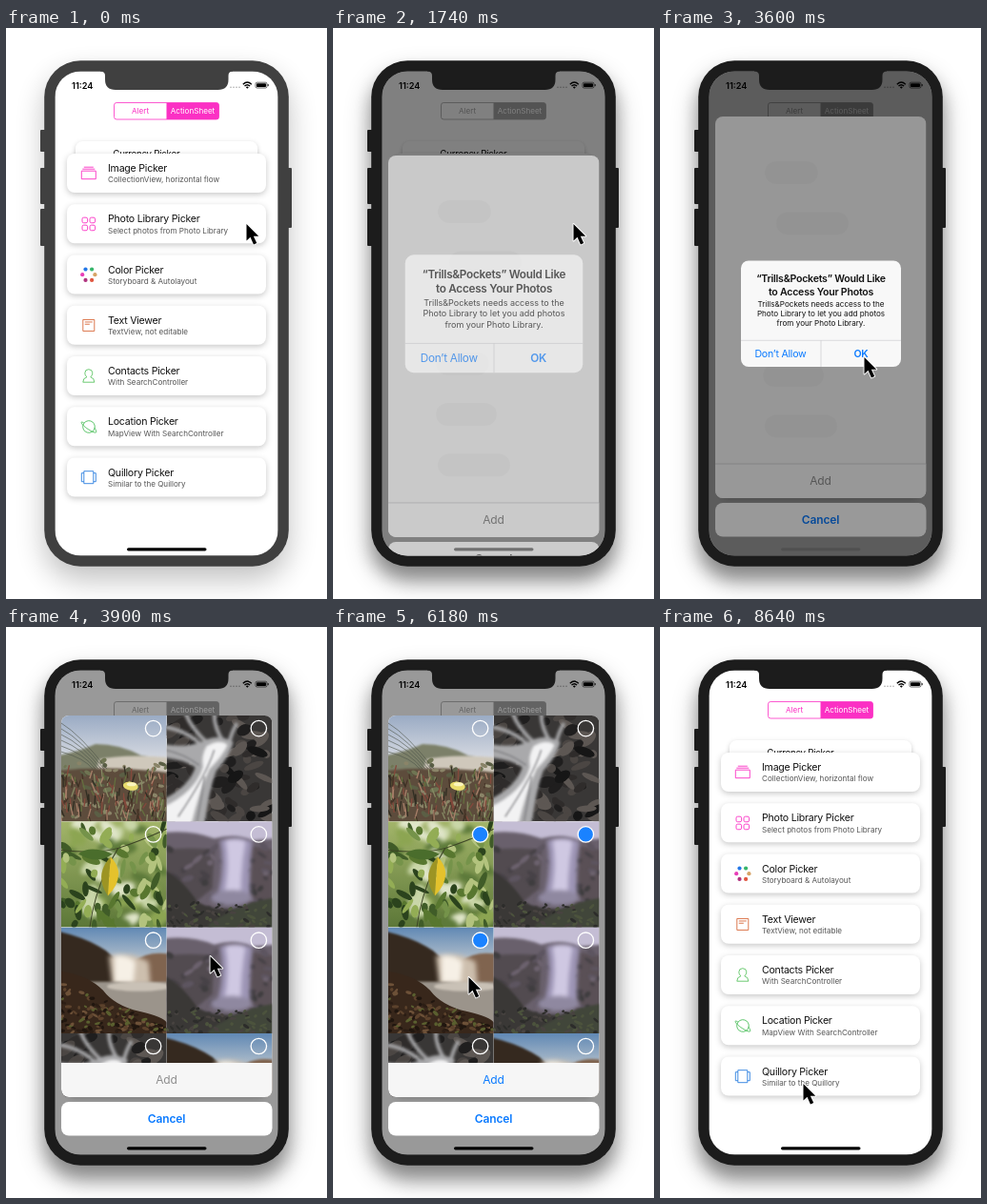
These frames come from a looping animation (337 px wide and 600 px high, 9.66 s). An HTML page:

```html
<!DOCTYPE html>
<html lang="en">
<head>
<meta charset="utf-8">
<title>Picker demo</title>
<style>
  html, body { margin: 0; width: 100%; height: 100%; overflow: hidden; background: #fff; }
  svg { display: block; width: 337px; height: 600px; }
  text { font-family: Inter, "Open Sans", sans-serif; }
  .title { font-size: 10.6px; letter-spacing: -.24px; fill: #111; }
  .sub { font-size: 8.1px; fill: #555; }
  .big { font-size: 12px; letter-spacing: -.15px; }
  .mid { text-anchor: middle; }
  .bold { font-weight: 600; }
  .card { fill: #fff; filter: drop-shadow(0 2px 3px rgba(0, 0, 0, .22)); }
  .line { fill: none; stroke-width: .9; }
  .rule { stroke: #c4c4c8; stroke-width: .6; }
</style>
</head>
<body>
<svg id="stage" viewBox="0 0 337 600"></svg>
<script>
const LOOP = 9660, STEP = 60;
const PINK = '#fb30c4', BLUE = '#1a82ff', GREY = '#a4a4a4';

let seed = 7;
const rnd = (a = 0, b = 1) => {
  seed = (seed * 16807) % 2147483647;
  return a + (b - a) * seed / 2147483647;
};
const pick = list => list[Math.floor(rnd(0, list.length))];
const many = (n, f) => Array.from({ length: n }, (_, i) => f(i)).join('');
const text = (x, y, s, cls, more = '') => `<text x="${x}" y="${y}" class="${cls}" ${more}>${s}</text>`;
const rect = (x, y, w, h, r, fill, more = '') =>
  `<rect x="${x}" y="${y}" width="${w}" height="${h}" rx="${r}" fill="${fill}" ${more}/>`;
const path = (d, fill, more = '') => `<path d="${d}" fill="${fill}" ${more}/>`;
const stroke = (d, color, w) => path(d, 'none', `stroke="${color}" stroke-width="${w}"`);
const gradient = (id, a, b) =>
  `<linearGradient id="${id}" x2="0" y2="1"><stop stop-color="${a}"/><stop offset="1" stop-color="${b}"/></linearGradient>`;
const leaf = (x, y, rx, ry, turn, fill) =>
  `<ellipse rx="${rx}" ry="${ry}" fill="${fill}" transform="translate(${x} ${y}) rotate(${turn})"/>`;
const soft = (blur, art) => `<g style="filter:blur(${blur}px)">${art}</g>`;

// Scattered specks between the line y = top + slope * x and the bottom of a tile
const specks = (n, top, slope, size, colors) => many(n, () => {
  const x = rnd(0, 111), y = rnd(Math.min(111, top + slope * x), 111);
  return leaf(x, y, rnd(size / 3, size), rnd(size / 4, size / 2), rnd(-50, 50), pick(colors));
});

// Simplified landscapes on a 111 x 111 tile
const photos = {
  dune: () => rect(0, 0, 111, 60, 0, 'url(#haze)') +
    soft(.8, path('M-4 42Q18 38 36 30Q62 30 84 42L114 46V75H-4Z', '#7c8069') +
      path('M40 46Q66 40 114 44V60H36Z', '#cfc8bb') +
      path('M-4 58Q50 52 114 60V114H-4Z', '#5d4c3c')) +
    specks(60, 44, .05, 5, ['#6f7553', '#8a8468', '#5b5f45']) +
    many(170, () => {
      const x = rnd(0, 111), y = rnd(64, 114);
      return stroke(`M${x} ${y}l${rnd(-4, 4)} ${-rnd(5, 13)}`,
        pick(['#84493c', '#65703f', '#a9806a', '#302d22', '#868a64', '#453326']), 1.3);
    }) +
    many(6, i => stroke(`M0 ${8 + i * 6}Q${20 + i} ${20 + i * 5} ${48 - i * 3} 56`, '#4c5248', .6)) +
    leaf(73, 74, 8, 4.5, 8, '#e9dc6c') + leaf(74, 72, 5, 2, 0, '#fbf5bd'),

  stream: () => rect(0, 0, 111, 111, 0, '#393736') +
    specks(90, 0, 0, 12, ['#1f1e1e', '#4b4643', '#161616', '#5d5753', '#2f2c2b']) +
    soft(1.6, stroke('M-2 12Q22 16 40 34M20 -2Q26 14 44 30M50 -2Q50 14 60 28M74 8Q68 18 66 28', '#a3a3a5', 4) +
      path('M36 28Q54 18 70 28Q66 44 52 58Q44 80 40 114H-4V88Q24 74 30 54Q16 46 -4 44V30Q18 34 36 28Z', '#a9a9ab') +
      path('M42 32Q56 24 64 31Q58 44 45 56Q34 80 26 114H-4V96Q30 80 38 54Q36 42 42 32Z', '#f2f2f3')) +
    soft(.8, stroke('M50 36Q42 62 12 106M40 64Q36 90 32 111M-2 36Q18 40 34 52', '#7d7d80', 1.3)),

  leaves: () => rect(0, 0, 111, 111, 0, 'url(#green)') +
    soft(2, specks(40, 0, 0, 15, ['#c9d6a8', '#8ca552', '#dfe5c8', '#5d7a3a'])) +
    soft(.5, many(75, () => leaf(rnd(0, 111), rnd(0, 111), rnd(4, 11), rnd(2, 4.5), rnd(20, 130),
      pick(['#405c28', '#75934a', '#93ad55', '#2b431d', '#b3c37e', '#58772f'])))) +
    stroke('M0 30Q40 34 60 28T111 8M30 111Q36 66 60 28', '#3c4425', 1) +
    path('M18 34Q30 24 54 34Q38 46 18 34Z', '#4a6d2c') +
    path('M52 37Q34 56 49 78Z', '#9c9424') + path('M52 37Q70 56 49 78Z', '#e4c22c'),

  falls: () => rect(0, 0, 111, 111, 0, '#c4bdd4') +
    soft(1.5, path('M-4 12Q24 8 50 18Q72 12 90 20L114 18V114H-4Z', '#69606c') +
      path('M-4 30Q26 26 50 30L48 70L24 90H-4Z', '#524b50') +
      path('M90 26L114 30V90H84Z', '#5a5056')) +
    soft(1, specks(70, 26, 0, 7, ['#5d5560', '#474247', '#6c626e', '#3f3d3f'])) +
    soft(2, path('M56 20Q74 14 90 21Q86 50 88 82H52Q62 50 56 20Z', '#9d95b5') +
      path('M62 20Q74 17 83 21Q78 48 78 78H60Q67 48 62 20Z', '#cfc8e2') +
      leaf(68, 80, 22, 8, 0, '#8f88a0')) +
    soft(1, path('M-4 50Q16 60 32 84Q58 100 114 84V114H-4Z', '#3a3836') +
      path('M44 108Q80 84 114 80V114H44Z', '#41463a')) +
    specks(70, 84, .04, 4, ['#2c2c2a', '#4c533d', '#484340']),

  gorge: () => rect(0, 0, 111, 60, 0, 'url(#sky)') +
    soft(1, path('M76 36Q92 24 114 28V62H76Z', '#80644f') +
      path('M-4 4Q22 10 40 20Q56 28 62 44L60 64H-4Z', '#35291f')) +
    soft(2.5, path('M50 30Q70 24 92 36L94 62H54Z', '#cdbfae') +
      path('M56 30Q68 28 78 36L76 58H56Z', '#f6f0e6')) +
    soft(1.2, path('M30 57H114V102H30Z', '#9b948b') + leaf(82, 62, 34, 5, 0, '#c9c1b6')) +
    path('M0 46Q28 50 44 66Q56 82 82 88T111 100V111H0Z', '#38271b') +
    specks(150, 56, .45, 4, ['#5c422c', '#20160f', '#6d5138', '#5a5f2f', '#2b1d14'])
};
const symbols = Object.entries(photos)
  .map(([id, art]) => `<symbol id="${id}" viewBox="0 0 111 111" preserveAspectRatio="none">${art()}</symbol>`).join('');
const tiles = ['dune', 'stream', 'leaves', 'falls', 'gorge', 'falls', 'stream', 'gorge'];
const tileX = i => 58 + (i % 2) * 110.75, tileY = i => 93 + (i >> 1) * 111.3;
const tile = (id, i) => `<use href="#${id}" x="${tileX(i)}" y="${tileY(i)}" width="110.75" height="111.3"/>` +
  `<circle id="mark${i}" cx="${tileX(i) + 96.6}" cy="${tileY(i) + 13.6}" r="8.2" stroke="#fff" stroke-width="1.3"/>`;

// Icons are centred on 0,0
const icon = (d, color) => `<path class="line" stroke="${color}" d="${d}"/>`;
const rows = [
  ['Image Picker', 'CollectionView, horizontal flow',
    icon('M-7.5 -2.5H7.5V6H-7.5ZM-6.5 -4.5H6.5M-5 -6.5H5', PINK)],
  ['Photo Library Picker', 'Select photos from Photo Library',
    many(4, i => rect(i % 2 ? 1.2 : -6.8, i > 1 ? 1.2 : -6.8, 5.6, 5.6, 1.6, 'none', `stroke="${PINK}" stroke-width=".9"`))],
  ['Color Picker', 'Storyboard &amp; Autolayout',
    ['#35b56a', '#d6a466', '#e0563f', '#b0337f', '#e83fb8', '#2478e8'].map((c, i) => {
      const a = (i - 1) * Math.PI / 3;
      return `<circle cx="${6.6 * Math.cos(a)}" cy="${6.6 * Math.sin(a)}" r="2.1" fill="${c}"/>`;
    }).join('')],
  ['Text Viewer', 'TextView, not editable',
    icon('M-6 -6H6V6H-6ZM-4 -3.5H4M-4 -1.2H1', '#d9693c')],
  ['Contacts Picker', 'With SearchController',
    icon('M-6 6.5Q-6 2 -2 1.2Q-4 -1 -4 -3A4 4 0 0 1 4 -3Q4 -1 2 1.2Q6 2 6 6.5Z', '#5cc463')],
  ['Location Picker', 'MapView With SearchController',
    icon('M6.3 1.5A6.3 6.3 0 1 1 2 -6A6.3 6.3 0 0 1 6.3 1.5M-5 -4C-10 -7 -8 -2 0 3S10 7 6 1', '#4cbf5c')],
  ['Quillory Picker', 'Similar to the Quillory',
    icon('M-5 -6.5H5V6.5H-5ZM-5 -4.5H-7.5V4.5H-5M5 -4.5H7.5V4.5H5', '#2c7fe0')]
];
const rowY = i => 132 + i * 53.25;
const row = ([title, sub, art], i) => `<g transform="translate(0 ${rowY(i)})">` +
  rect(64, 0, 209, 41, 8, '#fff', 'class="card"') + `<g transform="translate(86.8 20.7)">${art}</g>` +
  text(107, 19, title, 'title') + text(107, 30.3, sub, 'sub') + '</g>';

// Faint silhouettes of the list behind the translucent sheet
const ghosts = [[138, 28], [160, 38], [135, 24], [136, 28], [140, 32], [148, 38], [150, 42]]
  .map(([x, w], i) => rect(x - w, rowY(i) + 8, w * 2, 24, 12, '#000', 'opacity=".025"')).join('');

const alertBox = rect(85, 244.5, 168, 111.5, 8, '#f8f8f8') +
  text(169, 266.5, '“Trills&amp;Pockets” Would Like', 'title mid bold') +
  text(169, 280.5, 'to Access Your Photos', 'title mid bold') +
  ['Trills&amp;Pockets needs access to the', 'Photo Library to let you add photos', 'from your Photo Library.']
    .map((s, i) => text(169, 293 + i * 10.1, s, 'sub mid', 'style="fill:#111"')).join('') +
  '<path class="rule" d="M85 328.3H253M169 328.3V356"/>' +
  text(126.5, 346.3, 'Don’t Allow', 'title mid', 'style="fill:#0a7aff"') +
  text(211, 346.3, 'OK', 'title mid bold', 'style="fill:#0a7aff"');

const screen = (fill, more) => rect(51.4, 45.4, 234.2, 509.2, 0, fill, more);
const shadow = (blur, more) => rect(40, 48, 257, 532, 38, '#000', `style="filter:blur(${blur}px)" ${more}`);

const stage = document.getElementById('stage');
stage.innerHTML = `<defs>
  ${gradient('haze', '#9aabc4', '#e9e8ea')}${gradient('green', '#a3b56a', '#5c7738')}${gradient('sky', '#6088b4', '#f0e9dd')}
  <clipPath id="screen">${rect(51.4, 45.4, 234.2, 509.2, 27, '#000')}</clipPath>
  <clipPath id="sheetClip">${rect(58, 93, 221.5, 401, 8, '#000')}</clipPath>
  ${symbols}</defs>
  ${shadow(15, 'opacity=".24"')}${shadow(9, 'id="focus" opacity=".32"')}
  <g id="body">
    ${rect(40.2, 34.3, 256.6, 531.4, 38, 'inherit')}
    ${rect(36, 107, 6, 23, 1, 'inherit')}${rect(36, 147, 6, 38, 1, 'inherit')}${rect(36, 190, 6, 39, 1, 'inherit')}
    ${rect(295, 147, 5, 63, 1, 'inherit')}
  </g>
  <g clip-path="url(#screen)">
    ${screen('#fff')}
    <g transform="translate(73 119) scale(.914)">${rect(0, 0, 209, 41, 8, '#fff', 'class="card"')}
      ${text(43, 19, 'Currency Picker', 'title')}</g>
    ${rows.map(row).join('')}
    <g id="tint">
      ${rect(113.5, 78.5, 110, 17.5, 2.6, 'none', 'stroke="currentColor" stroke-width=".8"')}
      ${path('M168.5 78.5H221Q223.5 78.5 223.5 81V93.5Q223.5 96 221 96H168.5Z', 'currentColor')}
      ${text(141, 90, 'Alert', 'mid', 'font-size="8.1" fill="currentColor"')}
      ${text(196, 90, 'ActionSheet', 'mid', 'font-size="8.1" fill="#fff"')}
    </g>
    ${screen('#000', 'id="dim"')}
    <g id="sheet">
      <g clip-path="url(#sheetClip)">
        ${rect(58, 93, 221.5, 401, 0, '#fcfcfc')}${ghosts}
        <g id="photos">${tiles.map(tile).join('')}</g>
        ${rect(58, 458, 221.5, 36, 0, '#f6f6f6', 'id="bar"')}
        <path id="rule" class="rule" d="M58 458H280"/>
        ${text(168.5, 480.4, 'Add', 'big mid', 'id="add"')}
      </g>
      ${rect(58, 499, 221.5, 35.5, 8, '#fff')}
      ${text(168.5, 521.3, 'Cancel', 'big mid bold', 'id="cancel"')}
    </g>
    ${screen('#000', 'id="veil"')}
    <g id="alert">${alertBox}</g>
    ${text(69, 63.5, '11:24', 'bold', 'font-size="9.2"')}
    ${many(4, i => `<circle cx="${236 + i * 3}" cy="62.3" r=".8" fill="#000" opacity=".35"/>`)}
    ${stroke('M248.8 59.2Q253.3 55 257.8 59.2M250.5 61.1Q253.3 58.5 256.1 61.1', '#000', 1.4)}
    ${path('M251.8 62.2Q253.3 61 254.8 62.2L253.3 63.8Z', '#000')}
    ${rect(262, 57.2, 12, 5.8, 1.6, 'none', 'stroke="#000" stroke-width=".6"')}
    ${rect(263, 58.2, 10, 3.8, .8, '#000')}${rect(274.7, 59, .9, 2.2, .4, '#000')}
    ${rect(127, 546.2, 83.5, 3.2, 1.6, '#000', 'id="home"')}
  </g>
  ${path('M99 44H238V45.4Q233.5 45.4 233.5 50V54Q233.5 65 222.5 65H115Q104 65 104 54V50Q104 45.4 99 45.4Z', '#000', 'id="notch"')}
  <g id="cursor">${path('M0 0V19.2L4.4 15.2L8.2 23.6L11.8 22L8.1 13.9H14Z', '#000',
    'transform="translate(.5 1) scale(.91)" stroke="#fff" stroke-width="2" stroke-linejoin="round" paint-order="stroke"')}</g>`;

const $ = id => document.getElementById(id);
const set = (id, attrs) => { for (const k in attrs) $(id).setAttribute(k, attrs[k]); };
const clamp = v => Math.max(0, Math.min(1, v));
const between = (t, a, b) => t >= a && t < b;
const smooth = p => p * p * (3 - 2 * p);

// Pointer moves: start, end, x, y
const moves = [
  [0, 1, 252, 205], [2280, 2880, 214, 351], [2880, 3000, 214, 345], [4260, 4680, 130, 281],
  [5040, 5340, 212, 269], [5700, 6000, 142, 367], [6240, 6480, 112, 264], [6900, 7440, 150, 479]
];
function pointer(t) {
  let [, , x, y] = moves[0];
  for (const [a, b, toX, toY] of moves) {
    const p = smooth(clamp((t - a) / (b - a)));
    x += (toX - x) * p;
    y += (toY - y) * p;
  }
  return [x, y];
}

function snap(t) {
  t = Math.floor(t / STEP) * STEP;
  for (const [a, b] of [[1320, 1440], [1560, 1740], [1740, 1860], [3600, 3720]])
    if (between(t, a, b)) return a;
  return t;
}

function draw(ms) {
  const t = snap(ms % LOOP);
  const shell = t < 1320 ? '#404040' : '#1c1c1c';
  set('body', { fill: shell });
  set('notch', { fill: shell });
  set('focus', { visibility: t < 1320 ? 'hidden' : 'visible' });

  const rise = Math.sin(clamp((t - 1380) / 480) * Math.PI / 2);
  const fall = smooth(clamp((t - 8340) / 300));
  set('sheet', { transform: `translate(0 ${538 * (1 - rise) + 480 * fall})` });
  set('dim', { opacity: .4 * rise * (1 - fall) });
  set('tint', { color: between(t, 1440, 8400) ? GREY : PINK });

  const alertOn = between(t, 1740, 3720), entering = between(t, 1740, 1860);
  const scale = entering ? 1.11 : 1;
  set('veil', { opacity: !alertOn ? 0 : entering ? .2 : t < 3600 ? .42 : .4 });
  set('alert', {
    opacity: !alertOn ? 0 : entering ? .62 : 1,
    transform: `translate(169 300.2) scale(${scale}) translate(-169 -300.2)`
  });
  set('home', { opacity: entering ? .45 : alertOn ? .12 : 1 });
  set('cancel', { fill: between(t, 1740, 3600) ? '#777' : '#0a7aff' });

  const loaded = t >= 3900;
  set('photos', { opacity: loaded ? 1 : 0 });
  set('rule', { opacity: loaded ? 0 : 1 });
  set('add', { fill: t < 4980 ? '#8e8e8e' : '#0a7aff' });
  set('bar', { fill: t >= 8220 ? '#e2e2e2' : loaded ? '#f6f6f6' : '#fcfcfc' });
  const chosen = { 2: between(t, 4980, 6720), 3: t >= 5520, 4: t >= 6180 };
  tiles.forEach((_, i) => set('mark' + i, { fill: chosen[i] ? BLUE : 'none' }));

  set('cursor', { transform: `translate(${pointer(t)})` });
}

const start = performance.now();
(function tick() {
  draw(performance.now() - start);
  requestAnimationFrame(tick);
})();
</script>
</body>
</html>
```
